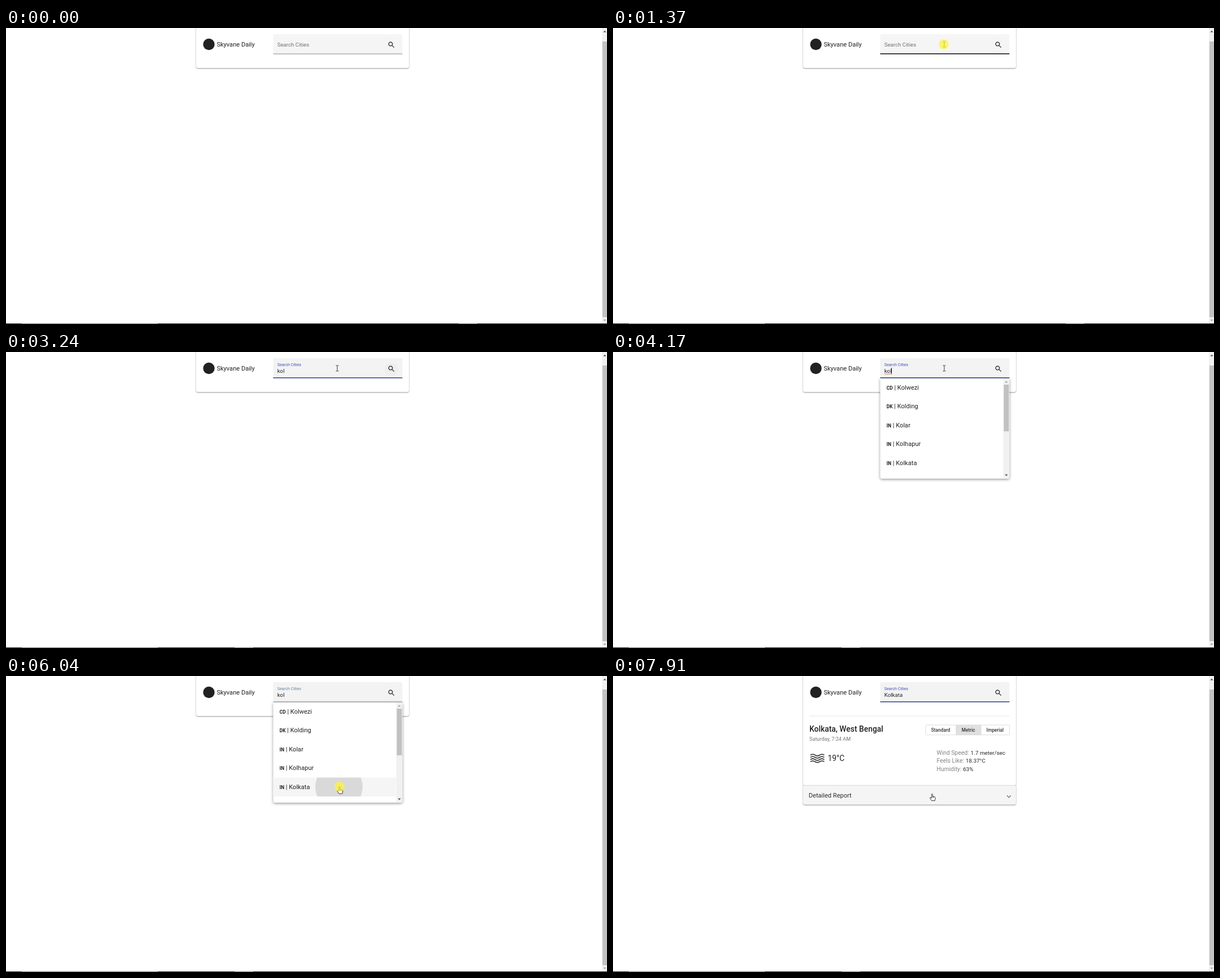
Animation, 1065 px wide and 526 px high, one loop 8 s. Source, as an HTML page with a canvas:

```html
<!DOCTYPE html>
<html lang="en">
<head>
<meta charset="utf-8">
<title>Weather search</title>
<style>
  html, body { margin: 0; width: 100%; height: 100%; overflow: hidden; background: #fff; }
  canvas { display: block; }
</style>
</head>
<body>
<canvas id="stage" width="1065" height="526"></canvas>
<script>
const LOOP = 8000, TICK = 155;
const ctx = document.getElementById('stage').getContext('2d');

const SEARCH = new Path2D('M15.5 14h-.79l-.28-.27C15.41 12.59 16 11.11 16 9.5 16 5.91 13.09 3 9.5 3S3 5.91 3 9.5 5.91 16 9.5 16c1.61 0 3.09-.59 4.23-1.57l.27.28v.79l5 4.99L20.49 19l-4.99-5zm-6 0C7.01 14 5 11.99 5 9.5S7.01 5 9.5 5 14 7.01 14 9.5 11.99 14 9.5 14z');
const HAND = new Path2D('M-1 1Q0-.7 1 1V5L4.8 5.9Q6 6.3 5.8 7.8L4.9 12.6H-.9L-3.9 8.2Q-4 6.6-2.4 7.1L-1 8.3ZM1 5V7M2.9 5.6V7.2');
const ARROW = new Path2D('M0 0V10.6L2.5 8.3 4 11.8 5.7 11 4.2 7.7H7.5Z');
const BEAM = new Path2D('M-2.5-5H-.6L0-4.4.6-5H2.5M0-4.4V4.4M-2.5 5H-.6L0 4.4.6 5H2.5');

// [time, x, y, shape]: the pointer holds each place until the next one
const POINTER = [
  [430, 960, 481, ARROW], [580, 674, 66, ARROW], [900, 640, 51, ARROW], [1060, 587, 29, BEAM],
  [5570, 590, 90, HAND], [5720, 591, 196.5, HAND],
  [7580, 583, 201, HAND], [7730, 571, 207, HAND], [7910, 565.5, 209, HAND]
];
const CARET_ON = [[1540, 2010], [2320, 3240], [3710, 4320], [4800, 5260], [5720, 5890], [6340, 6800], [7270, 7730]];
const TYPED = [[0, ''], [2320, 'k'], [2460, 'ko'], [2770, 'kol'], [6340, 'Kolkata']];
const CITIES = [['CD', 'Kolwezi'], ['DK', 'Kolding'], ['IN', 'Kolar'], ['IN', 'Kolhapur'], ['IN', 'Kolkata']];

const within = (t, a, b) => t >= a && t < b;
const latest = (list, t) => list.filter(k => k[0] <= t).pop();

function rect(x, y, w, h, color, radius = 0) {
  ctx.fillStyle = color;
  ctx.beginPath();
  ctx.roundRect(x, y, w, h, radius);
  ctx.fill();
}

function circle(x, y, r, color) {
  ctx.fillStyle = color;
  ctx.beginPath();
  ctx.arc(x, y, r, 0, 7);
  ctx.fill();
}

function text(str, x, y, size, color, weight = 400) {
  ctx.font = `${weight} ${size}px Roboto, sans-serif`;
  ctx.fillStyle = color;
  ctx.fillText(str, x, y);
  return x + ctx.measureText(str).width;
}

function stroke(path, width, color) {
  ctx.lineWidth = width;
  ctx.strokeStyle = color;
  ctx.stroke(new Path2D(path));
}

function raised(x, y, w, h, color, radius, blur = 2.5, drop = 1) {
  ctx.save();
  ctx.shadowColor = 'rgba(0,0,0,.42)';
  ctx.shadowBlur = blur;
  ctx.shadowOffsetY = drop;
  rect(x, y, w, h, color, radius);
  ctx.restore();
}

function triangle(x, y, dir, color) {
  ctx.fillStyle = color;
  ctx.fill(new Path2D(`M${x - 2.6} ${y + dir * 1.4}h5.2l-2.6 ${-dir * 2.8}z`));
}

function pageFrame(t) {
  rect(0, 0, 1065, 526, '#fff');
  rect(1056, 0, 9, 526, '#f1f1f1');
  rect(1057, 24, 8, 490, '#c1c1c1');
  triangle(1061, 6, 1, '#505050');
  triangle(1061, 519.5, -1, '#a3a3a3');
  rect(0, 525, 1065, 1, '#101412');
  rect(28, 525, 241, 1, '#707370');
  rect(t < 1540 ? 802 : 405, 525, 33, 1, '#707370');
}

function field(t) {
  const focused = within(t, 1540, 6040) || t >= 6340;
  const blue = '#3f51b5';
  rect(473.5, 11, 229, 35.5, t < 1540 ? '#f5f5f5' : '#f3f3f3', [3, 3, 0, 0]);
  rect(473.5, 45.6, 229, 0.9, '#8c8c8c');
  if (within(t, 1060, 1540)) rect(473.5, 45, 229, 1.5, '#1c1c1c');
  if (focused) {
    const inset = within(t, 6340, 6490) ? 3 : 0;
    rect(473.5 + inset, 45, 229 - 2 * inset, 1.5, blue);
  }

  const steps = Math.min(3, Math.max(0, Math.floor((t - 1540) / TICK)));
  const lift = 1 - Math.pow(0.2, steps) * (steps < 3);
  const color = focused ? blue : within(t, 6040, 6180) ? '#667f9c' : '#707070';
  text('Search Cities', 480.7, 33 - 7.8 * lift, 9.7 - 2.42 * lift, color);

  const end = text(latest(TYPED, t)[1], 480.7, 37.4, 9.7, '#222');
  if (CARET_ON.some(([a, b]) => within(t, a, b))) rect(Math.floor(end), 28, 1, 11, '#222');
  if (within(t, 3860, 6040)) {
    stroke('M481 39.2' + 'q.8-1.3 1.6 0t1.6 0'.repeat(4), 0.8, '#e0453a');
  }

  if (within(t, 3240, 3390)) circle(683, 31, 12, 'rgba(0,0,0,.02)');
  ctx.save();
  ctx.translate(675.7, 22.6);
  ctx.scale(0.61, 0.61);
  ctx.fillStyle = '#1c1c1c';
  ctx.fill(SEARCH);
  ctx.restore();
}

function suggestions(t) {
  raised(473.5, 47, 229, 178, '#fff', [0, 0, 3, 3], 5, 1.5);
  if (t >= 5890) {
    ctx.save();
    ctx.beginPath();
    ctx.rect(473.5, 180.5, 217.5, 33.5);
    ctx.clip();
    rect(473, 180, 218, 35, '#f5f5f5');
    if (t >= 6040) circle(590, 197, t < 6180 ? 42 : 118, '#d9d9d9');
    ctx.restore();
  }
  CITIES.forEach(([country, city], i) => {
    const y = 66.6 + 33.5 * i;
    const x = text(country, 484.8, y, 8.32, '#1f1f1f', 700);
    text(' | ' + city, x, y, 11.09, '#222');
  });
  rect(691.5, 47, 10.5, 177, '#f1f1f1');
  rect(692.5, 58, 9, 83, '#c1c1c1');
  triangle(697, 53, 1, '#a3a3a3');
  triangle(697, 219, -1, '#505050');
}

function report() {
  rect(348, 70.7, 354.5, 0.8, '#dedede');
  text('Kolkata, West Bengal', 348, 98.9, 13.87, '#212121', 500);
  text('Saturday, 7:24 AM', 348, 114.6, 9.15, '#757575');

  rect(608, 87, 44, 18, '#e0e0e0');
  ctx.lineWidth = 0.8;
  ctx.strokeStyle = '#d4d4d4';
  ctx.beginPath();
  ctx.roundRect(554, 87, 148.5, 17.7, 2.5);
  ctx.stroke();
  stroke('M608 87v18M652 87v18', 0.8, '#d4d4d4');
  text('Standard', 563.8, 99, 8.32, '#333', 500);
  text('Metric', 617.8, 99, 8.32, '#333', 500);
  text('Imperial', 661.8, 99, 8.32, '#333', 500);

  for (let i = 0; i < 4; i++) {
    stroke(`M349.8 ${140.6 + i * 3.9}q4.1-2.8 8.2 0t8.2 0t8.2 0`, 1.8, '#3c3c3c');
  }
  text('19°C', 380.4, 151.3, 13.87, '#212121');
  [['Wind Speed:', 633.8, '1.7 meter/sec'], ['Feels Like:', 625, '18.37°C'], ['Humidity:', 620.3, '63%']]
    .forEach(([name, x, value], i) => {
      const y = 139.6 + 14.6 * i;
      text(name, 573.5, y, 10.4, '#858585');
      text(value, x, y, 9.9, '#262626');
    });

  raised(337, 194.5, 377, 34, '#f5f5f5', 3);
  text('Detailed Report', 346.8, 215.8, 11.09, '#2b2b2b');
  stroke('M698 212.2l3.5 3.5 3.5-3.5', 1.4, '#757575');
}

function pointer(t) {
  const key = latest(POINTER, t);
  if (!key) return;
  const [, x, y, shape] = key;
  ctx.save();
  ctx.translate(x, y);
  ctx.lineWidth = 0.9;
  ctx.lineJoin = 'round';
  ctx.strokeStyle = '#222';
  ctx.fillStyle = '#fff';
  if (shape !== BEAM) ctx.fill(shape);
  ctx.stroke(shape);
  ctx.restore();
  if (within(t, 1210, 1540) || within(t, 5890, 6180)) {
    circle(x - (shape === BEAM ? 1 : 0), y, 8.8, 'rgba(255,245,50,.7)');
  }
}

function draw(t) {
  const loaded = t >= 6340;
  pageFrame(t);
  raised(337, -10, 377, loaded ? 204.5 : 81, '#fff', 3);
  circle(359.5, 29, 10.2, '#212121');
  text('Skyvane Daily', 373.4, 33, 11.09, '#212121');
  field(t);
  if (within(t, 3860, 6340)) suggestions(t);
  if (loaded) report();
  pointer(t);
}

const start = performance.now();
function tick() {
  draw((performance.now() - start) % LOOP);
  requestAnimationFrame(tick);
}
tick();
</script>
</body>
</html>
```
